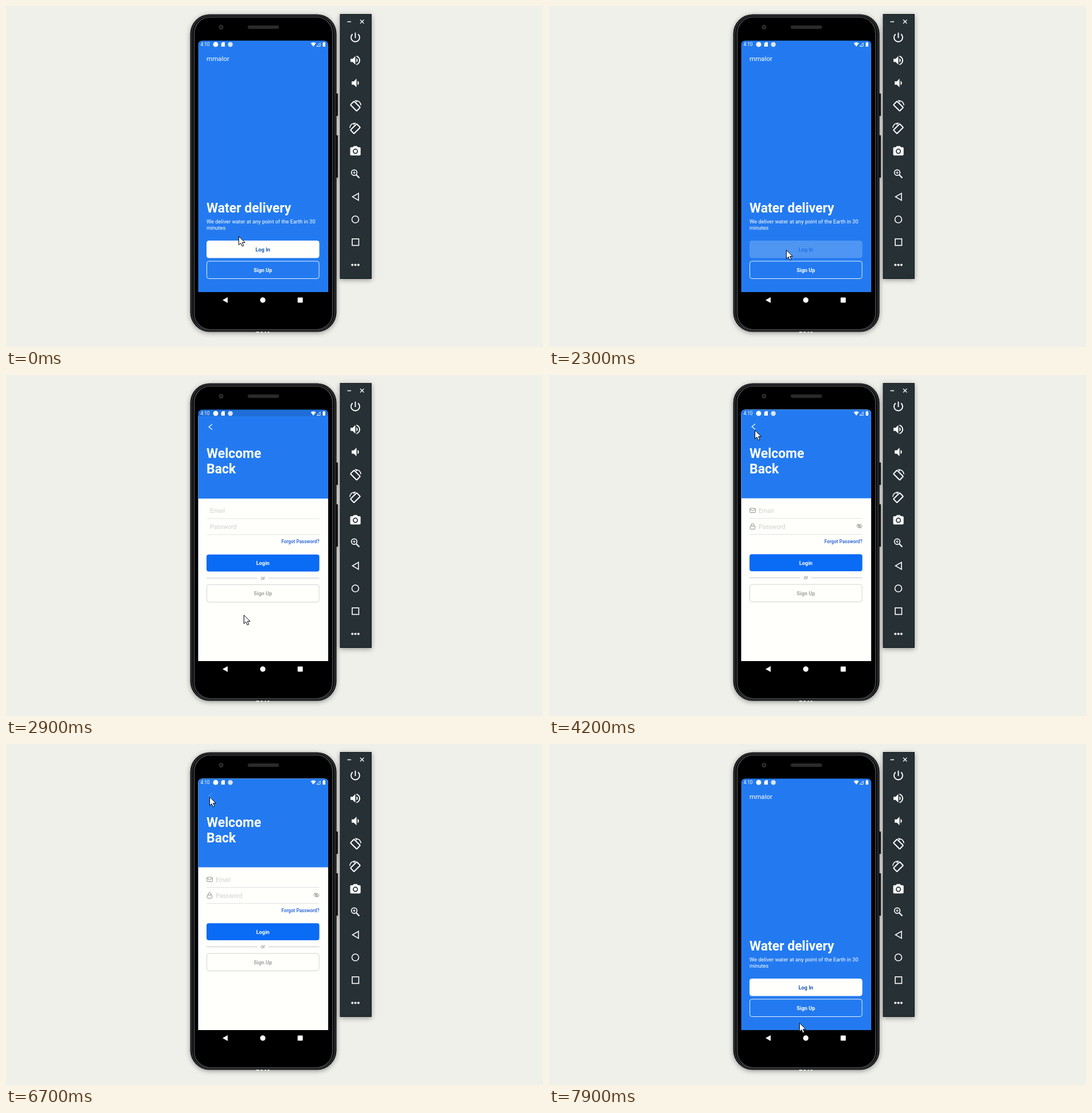
Write an HTML page that moves like this. It is 940 px wide and 596 px high and loops after 8000 ms.

```html
<!DOCTYPE html>
<html lang="en">
<head>
<meta charset="utf-8">
<title>Water delivery</title>
<style>
  html, body { margin: 0; width: 100%; height: 100%; overflow: hidden; background: #eff0ea; }
  svg { display: block; }
  text { font-family: Roboto, sans-serif; font-size: 9.25px; fill: #fffffc; }
  .bold { font-weight: 700; }
  .big { font-weight: 700; font-size: 23px; }
  .mid { text-anchor: middle; }
  .hint { font-size: 10.6px; fill: #cfd0ce; }
  .line { fill: none; stroke: #fff; }
  .grey { fill: none; stroke: #8d8e8d; stroke-width: 1; }
  .shadow { filter: drop-shadow(0 2px 4px rgba(0, 0, 0, .38)); }
</style>
</head>
<body>
<svg width="940" height="596" viewBox="0 0 940 596">
  <defs>
    <clipPath id="screenClip"><path d="M336.5 500V68q0-7.500 7.500-7.500H556.500q7.500 0 7.500 7.500V500Z"/></clipPath>
    <clipPath id="revealClip"><rect id="reveal" x="336" width="229" height="440"/></clipPath>
    <g id="rotate" class="line" stroke-width="2">
      <rect x="-7.700" y="-4.400" width="15.400" height="8.800" rx=".8" transform="rotate(45)"/>
      <path d="M3 -7L.5 -9.700Q8.500 -9.500 9.800 -1.500" stroke-width="1.500"/>
    </g>
  </defs>

  <!-- Phone body -->
  <g class="shadow">
    <path d="M577 153h4v39h-4zM577 226h4v74h-4z" fill="#17191a"/>
    <rect x="322.500" y="14.500" width="256" height="555" rx="34" fill="#0d0e0f"/>
  </g>
  <rect x="325" y="16.500" width="251" height="551" rx="32" fill="none" stroke="#34373a" stroke-width="1.600"/>
  <rect x="329.500" y="19.500" width="242" height="546" rx="28" fill="#000" stroke="#505357" stroke-width="1.200"/>
  <circle cx="376.500" cy="37" r="4.200" fill="#2b2c2e"/>
  <circle cx="376.500" cy="37" r="2" fill="#17181c"/>
  <rect x="423" y="34" width="55" height="6" rx="3" fill="#2a2a2b"/>
  <path d="M438 570h5m3 0h3m4 0h2m3 0h3" stroke="#fff" stroke-width="1.500"/>
  <g fill="#fff">
    <path d="M379 514l9-5v10z"/>
    <circle cx="449.500" cy="514" r="4.700"/>
    <rect x="510.500" y="509.500" width="9" height="9" rx="1"/>
  </g>

  <g clip-path="url(#screenClip)">
    <rect x="336" y="60" width="229" height="441" fill="#237af0"/>
    <g id="home">
      <text x="351" y="95.500" style="font-size:11.6px">mmalor</text>
      <text x="351" y="360.500" class="big">Water delivery</text>
      <text x="351" y="380">We deliver water at any point of the Earth in 30</text>
      <text x="351" y="390.700">minutes</text>
      <g id="loginButton">
        <rect x="351" y="410" width="197.500" height="30.500" rx="4.500" fill="#fffffc"/>
        <text x="449.700" y="429" class="bold mid" style="fill:#1b58b0">Log In</text>
      </g>
      <rect x="351.500" y="446" width="196.500" height="30.500" rx="4" class="line" stroke-width=".9"/>
      <text x="449.700" y="465" class="bold mid">Sign Up</text>
    </g>
    <rect id="shade" x="336" y="60" width="229" height="441"/>

    <g clip-path="url(#revealClip)">
      <rect x="336" y="60" width="229" height="441" fill="#fffffc"/>
      <g id="login">
        <rect x="336" y="60" width="229" height="155.500" fill="#237af0"/>
        <path id="back" d="M361 85.500L355 90.300L361 95" class="line" stroke-width="1.200"/>
        <text x="351" y="144.500" class="big">Welcome</text>
        <text x="351" y="171.700" class="big">Back</text>
        <g id="hints">
          <text x="357" y="240.500" class="hint">Email</text>
          <text x="357" y="268.800" class="hint">Password</text>
        </g>
        <g id="fieldIcons" class="grey">
          <rect x="351.700" y="233" width="9.600" height="7.500" rx="1"/>
          <path d="M352 234.500l4.500 3.200l4.500-3.200"/>
          <rect x="352.200" y="264" width="8.400" height="5.500" rx="1"/>
          <path d="M354 264v-2a2.400 2.400 0 0 1 4.800 0v2"/>
          <path d="M538.300 264q5-6.500 10 0q-5 6.500-10 0M539.500 260l7.500 8"/>
          <circle cx="543.300" cy="264" r="1.600"/>
        </g>
        <path d="M351 250.500h197.500M351 278.500h197.500" stroke="#e2e3e0"/>
        <text x="548.500" y="293.500" class="bold" text-anchor="end" style="font-size:8.2px;fill:#3c72da">Forgot Password?</text>
        <rect x="351" y="313.300" width="197.500" height="29.700" rx="4" fill="#0a6bf5"/>
        <text x="449.700" y="332" class="bold mid">Login</text>
        <path d="M351 354.500h89m19 0h89.500" stroke="#c6c7c5"/>
        <text x="449.700" y="357.300" class="mid" style="font-size:8.3px;fill:#777">or</text>
        <rect x="351.500" y="366" width="196.500" height="30.500" rx="4" class="line" style="stroke:#d2d3d0"/>
        <text x="449.700" y="385" class="bold mid" style="fill:#a3a4a2">Sign Up</text>
      </g>
    </g>

    <!-- Status bar -->
    <g fill="#fff">
      <text x="340.500" y="70.300" style="font-size:8.3px">4:10</text>
      <circle cx="367" cy="67.200" r="4.400"/>
      <path d="M376.800 65.500l2-2.200h4.200v7.700h-6.200z"/>
      <circle cx="392.700" cy="67.200" r="4.200" fill="#d5e5fb"/>
      <path d="M533.500 65q4.500-3 9 0l-4.500 6z"/>
      <path d="M544 70.500h6v-6z" class="line" stroke-width=".9"/>
      <path d="M554.500 64h1.200v-1h2v1h1.200v7h-4.400z"/>
    </g>
  </g>

  <!-- Emulator toolbar -->
  <rect x="585" y="14.500" width="54.500" height="462" fill="#263035" stroke="#10181b" class="shadow"/>
  <g class="line" stroke-width="1.300">
    <path d="M597.500 27.500h6.500M620 24l6.500 6.500M626.500 24l-6.500 6.500"/>
    <circle cx="609.500" cy="291.300" r="4.900" stroke-width="1.700"/>
    <path d="M613 295l5.500 5.500" stroke-width="2.200"/>
    <path d="M607 291.300h5m-2.500-2.500v5" stroke-width="1"/>
    <path d="M606.500 333.500l10.500-6.200v12.400z" stroke-width="1.600"/>
    <circle cx="611.500" cy="373" r="6" stroke-width="1.600"/>
    <rect x="606" y="407" width="11.500" height="11.500" stroke-width="1.600"/>
  </g>
  <use href="#rotate" x="611.500" y="175"/>
  <use href="#rotate" transform="translate(611.500 214.500) scale(-1 1)"/>
  <g fill="#fff">
    <path transform="translate(600.200 43.700) scale(.94)" d="M13 3h-2v10h2zM17.800 5.200l-1.400 1.400A7 7 0 1 1 7.600 6.600L6.200 5.200A9 9 0 1 0 17.800 5.200z"/>
    <path transform="translate(600.200 83.700) scale(.94)" d="M3 9v6h4l5 5V4L7 9zM16.500 12A4.500 4.500 0 0 0 14 8v8A4.500 4.500 0 0 0 16.500 12zM14 3.200v2.100a7 7 0 0 1 0 13.400v2.100a9 9 0 0 0 0-17.600z"/>
    <path transform="translate(600.400 123.300) scale(.94)" d="M5 9v6h4l5 5V4L9 9zM18.500 12A4.500 4.500 0 0 0 16 8v8A4.500 4.500 0 0 0 18.500 12z"/>
    <path transform="translate(600.700 243) scale(.91)" fill-rule="evenodd" d="M9 2L7.200 4H4a2 2 0 0 0-2 2v12a2 2 0 0 0 2 2h16a2 2 0 0 0 2-2V6a2 2 0 0 0-2-2h-3.200L15 2zM12 7a5 5 0 1 1 0 10a5 5 0 0 1 0-10z"/>
    <circle cx="611.600" cy="253.900" r="2.800"/>
    <circle cx="606.300" cy="452.500" r="2"/>
    <circle cx="611.600" cy="452.500" r="2"/>
    <circle cx="616.900" cy="452.500" r="2"/>
  </g>

  <path id="cursor" d="M.5.700V15.700L4 12.400L6.400 17.900L9 16.800L6.600 11.500H11.300Z" fill="#fff" stroke="#000" stroke-linejoin="round"/>
</svg>

<script>
const LOOP = 8000, STEP = 100;
const SCREEN_TOP = 61, SCREEN_HEIGHT = 439, SLIDE_TIME = 425;
const OPEN_AT = 2633, CLOSE_AT = 7166;

// Pointer path: time, x, y
const pointer = [
  [0, 407, 402], [600, 407, 402], [700, 408, 400], [1100, 408, 400],
  [1200, 409, 396], [1300, 409, 395], [1600, 411, 424], [1700, 411, 424],
  [1800, 411, 425], [1900, 411, 425], [2000, 414, 425], [2100, 414, 425],
  [2200, 415, 426], [2600, 415, 426], [2900, 416, 419], [3500, 360, 124],
  [3900, 360, 97], [4100, 360, 97], [4200, 360, 96], [6200, 360, 96],
  [6400, 356, 91], [6500, 356, 92], [7100, 356, 92], [7200, 356, 91],
  [7300, 356, 91], [7900, 438, 487]
];

const el = id => document.getElementById(id);
const move = (id, x, y) => el(id).setAttribute('transform', `translate(${x} ${y})`);
const clamp = v => Math.min(1, Math.max(0, v));

// Cubic bezier (.20833, .82, .25, 1)
function ease(x) {
  const curve = (s, a, b) => 3 * s * (1 - s) ** 2 * a + 3 * s * s * (1 - s) * b + s ** 3;
  let low = 0, high = 1;
  for (let i = 0; i < 24; i++) {
    const s = (low + high) / 2;
    if (curve(s, .20833, .25) < x) low = s; else high = s;
  }
  return curve(high, .82, 1);
}

function pointerAt(t) {
  const next = pointer.findIndex(key => key[0] > t);
  if (next < 0) return pointer[pointer.length - 1].slice(1);
  const [t0, x0, y0] = pointer[next - 1], [t1, x1, y1] = pointer[next];
  const u = (t - t0) / (t1 - t0), k = u * u * (3 - 2 * u);
  return [x0 + (x1 - x0) * k, y0 + (y1 - y0) * k];
}

function render(t) {
  const slide = start => ease(clamp((t - start) / SLIDE_TIME));
  const shown = t < CLOSE_AT ? slide(OPEN_AT) : 1 - slide(CLOSE_AT);
  const hidden = (1 - shown) * SCREEN_HEIGHT;

  move('home', 0, -.02 * SCREEN_HEIGHT * shown);
  el('shade').setAttribute('opacity', .1 * clamp(shown / .36));
  el('reveal').setAttribute('y', shown === 1 ? SCREEN_TOP - 1 : SCREEN_TOP + hidden);
  move('login', 0, .041 * hidden);

  el('loginButton').setAttribute('opacity', t < 2200 || t >= 2700 ? 1 : t < 2300 ? .5 : .2);
  el('back').setAttribute('opacity', t >= 6700 ? .2 : 1);

  const iconsReady = t >= 3100;
  el('fieldIcons').setAttribute('visibility', iconsReady ? 'visible' : 'hidden');
  move('hints', iconsReady ? 10 : 0, 0);

  move('cursor', ...pointerAt(t));
}

function tick() {
  const t = performance.now() % LOOP;
  render(Math.floor(t / STEP) * STEP);
  requestAnimationFrame(tick);
}
tick();
</script>
</body>
</html>
```
